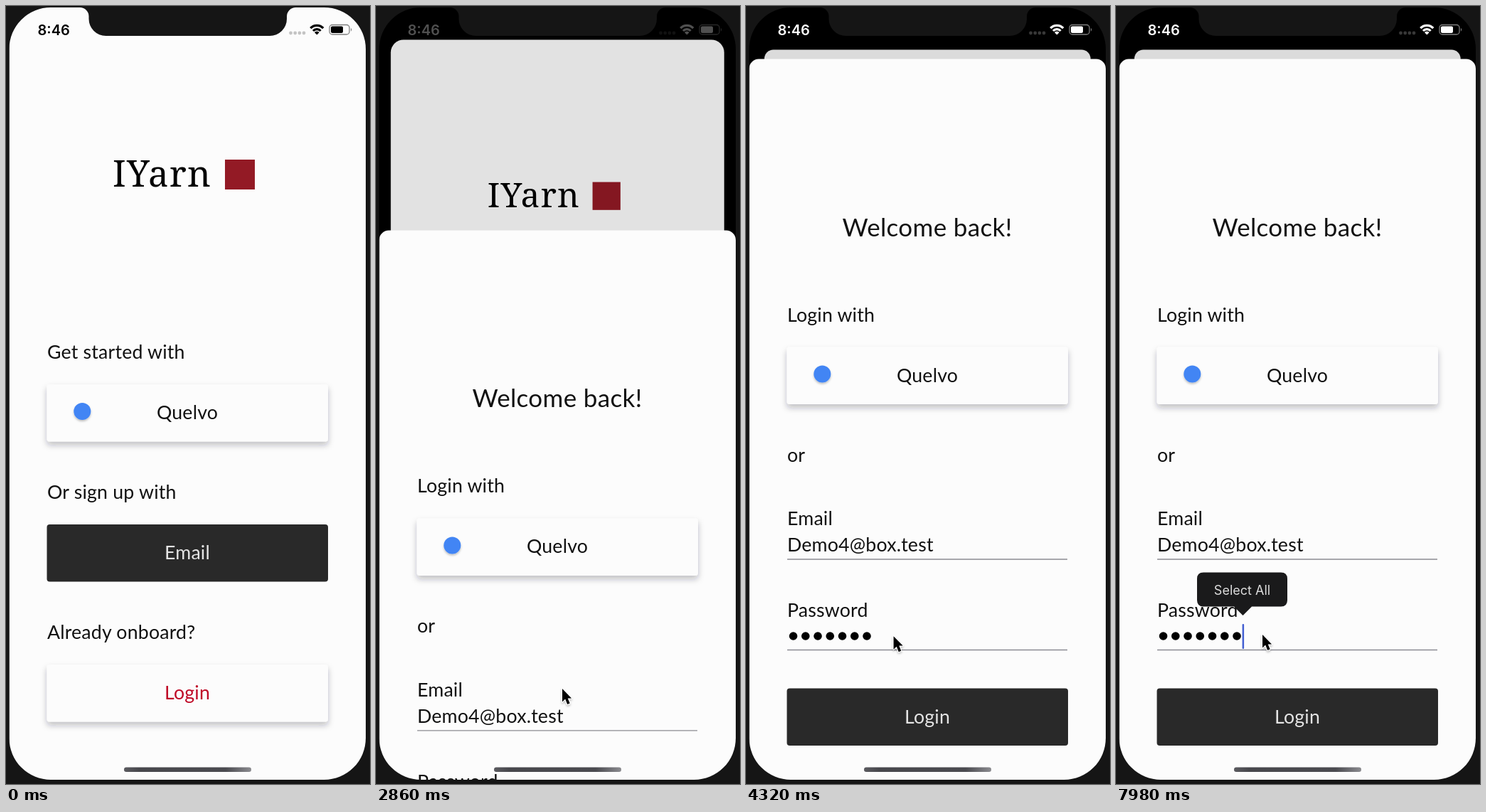
An HTML page for the animation above (8000 ms loop, 512 by 1094 pixels).

```html
<!DOCTYPE html>
<html lang="en">
<head>
<meta charset="utf-8">
<title>Login sheet</title>
<style>
  html, body { margin: 0; width: 100%; height: 100%; overflow: hidden; background: #151515; }
  svg { display: block; width: 100%; height: 100%; }
  text { font-family: Lato, "Open Sans", sans-serif; font-size: 26.700px; letter-spacing: .2px; fill: #111; white-space: pre; }
  .mid { text-anchor: middle; }
  .title { font-size: 35px; letter-spacing: .35px; }
  .mark { font-family: "Noto Serif", serif; font-size: 51px; letter-spacing: 1.200px; fill: #000; }
  .ui { font-family: Inter, sans-serif; letter-spacing: 0; }
  .light { fill: #e4e4e4; }
  .red { fill: #bf0a27; }
</style>
</head>
<body>
<svg viewBox="0 0 512 1094" xmlns="http://www.w3.org/2000/svg">
  <defs>
    <clipPath id="screen">
      <path d="M63 2H104A12.500 12.500 0 0 1 116.500 14.500V18A24 24 0 0 0 140.500 42H371A24 24 0 0 0 395 18V14.500A12.500 12.500 0 0 1 407.500 2H447.500A58.500 58.500 0 0 1 506 60.500V1029.500A58.500 58.500 0 0 1 447.500 1088H63A58.500 58.500 0 0 1 4.500 1029.500V60.500A58.500 58.500 0 0 1 63 2Z"/>
    </clipPath>
    <filter id="shade" x="-10%" y="-20%" width="120%" height="150%">
      <feDropShadow dx="0" dy="5" stdDeviation="4.500" flood-color="#1c1c30" flood-opacity=".27"/>
    </filter>
    <filter id="soft" x="-50%" y="-50%" width="200%" height="200%">
      <feDropShadow dx="0" dy="2" stdDeviation="1.500" flood-opacity=".25"/>
    </filter>
    <linearGradient id="bar">
      <stop offset="0" stop-color="#5b5b60"/>
      <stop offset=".12" stop-color="#47474c"/>
      <stop offset=".8" stop-color="#4b4b50"/>
      <stop offset="1" stop-color="#8c8c90"/>
    </linearGradient>
  </defs>
  <rect width="512" height="1094" fill="#151515"/>
  <g clip-path="url(#screen)">
    <rect width="512" height="1094" fill="#000"/>
    <g id="back">
      <rect class="page" x="4.500" y="2" width="501.500" height="1086" fill="#fcfcfc"/>
      <text class="mark" x="150" y="254">IYarn</text>
      <rect x="308" y="216" width="42" height="42" fill="#931a25"/>
      <g id="start"></g>
      <rect id="dim" class="page" x="4.500" y="2" width="501.500" height="1086"/>
    </g>
    <g id="status">
      <text class="ui" x="44.500" y="40.500" style="font-size:20px;font-weight:600;fill:currentColor">8:46</text>
      <g fill="currentColor" opacity=".22">
        <circle cx="400.500" cy="38" r="2.400"/><circle cx="406.700" cy="38" r="2.400"/>
        <circle cx="412.900" cy="38" r="2.400"/><circle cx="419" cy="38" r="2.400"/>
      </g>
      <path d="M428.300 31.200A12.500 12.500 0 0 1 446.300 31.200M432 35A7.300 7.300 0 0 1 442.600 35" fill="none" stroke="currentColor" stroke-width="3.200"/>
      <path d="M437.300 40.500L434 37.200A4.700 4.700 0 0 1 440.600 37.200Z" fill="currentColor"/>
      <rect x="455" y="26.500" width="28" height="13.500" rx="4" fill="none" stroke="currentColor" stroke-width="1.300" opacity=".5"/>
      <path d="M485 31Q487.500 33.200 485 35.700Z" fill="currentColor" opacity=".5"/>
      <rect x="457" y="28.500" width="17" height="9.500" rx="2" fill="currentColor"/>
    </g>
    <g id="sheet">
      <path d="M4.500 1200V88A13.500 13.500 0 0 1 18 74.500H492.500A13.500 13.500 0 0 1 506 88V1200Z" fill="#fcfcfc"/>
      <g id="form"></g>
      <rect id="caret" x="177.600" y="869" width="2.500" height="35" rx="1" fill="#4460d2"/>
      <g id="menu">
        <path d="M123 796.500H232Q241 796.500 241 805.500V835.500Q241 844.500 232 844.500H191L178.500 857L166 844.500H123Q114 844.500 114 835.500V805.500Q114 796.500 123 796.500Z" fill="#1a1a1b"/>
        <text class="ui mid" x="177.500" y="827.500" style="font-size:18px;fill:#dcdcdc">Select All</text>
      </g>
    </g>
    <rect id="home" x="166" y="1070.500" width="179" height="6.500" rx="3.200"/>
  </g>
  <path id="cursor" d="M0 0V18.500L4.200 14.600L7.200 22L10.700 20.500L7.700 13.400H13.100Z" fill="#000" stroke="#fff" stroke-width="2" stroke-linejoin="round" paint-order="stroke" filter="url(#soft)"/>
</svg>
<script>
const $ = id => document.getElementById(id);
const clamp = (v, lo = 0, hi = 1) => Math.min(hi, Math.max(lo, v));
const mix = (a, b, k) => a + (b - a) * k;
const ramp = (n, a, b) => clamp((n - a) / (b - a));
const ease = k => k * k * (3 - 2 * k);

const label = (str, y, cls = '', x = 58) => `<text class="${cls}" x="${x}" y="${y}">${str}</text>`;
const button = (str, y, cls, dark) =>
  `<rect x="57.500" y="${y}" width="395.500" height="80.500" rx="4" fill="${dark ? '#292929' : '#fcfcfc'}"${dark ? '' : ' filter="url(#shade)"'}/>`
  + label(str, y + 49, 'mid ' + cls, 255);
const social = y => button('Quelvo', y, '') +
  `<circle cx="107.300" cy="${y + 38}" r="12" fill="#4285f4" filter="url(#soft)"/>`;
const rule = y => `<path d="M58 ${y}H452" stroke="#8b8b92" stroke-width="1.300"/>`;
const bullets = (y, count) => Array.from({ length: count }, (_, i) =>
  `<circle cx="${66.500 + i * 17.250}" cy="${y}" r="5.800"/>`).join('');

$('start').innerHTML =
  label('Get started with', 496) + social(532) +
  label('Or sign up with', 693) + button('Email', 729, 'light', true) +
  label('Already onboard?', 890) + button('Login', 926, 'red');

$('form').innerHTML =
  label('Welcome back!', 323.500, 'title mid', 255) +
  label('Login with', 443.500) + social(479.500) +
  label('or', 640.500) +
  label('Email', 730) + label('Demo4@box.test', 767) + rule(778) +
  label('Password', 859) + bullets(886, 7) + rule(905.500) +
  button('Login', 959.500, 'light', true);

const pages = document.querySelectorAll('.page');
const loginText = document.querySelector('.red');

// Uneven playback: 11 ticks per 380 ms, two of them held for 100 ms. Tick 0 opens the sheet.
function tickAt(ms) {
  const t = ms - 2520, lap = Math.floor(t / 380), p = t - lap * 380;
  const step = p < 180 ? Math.max(0, Math.floor(p / 20) - 4)
                       : 5 + Math.max(0, Math.floor((p - 180) / 20) - 4);
  return lap * 11 + step;
}

function caretAlpha(n) {
  if (n < 67) return 0;
  if (n >= 147) return 1;
  const p = (n - 67) % 30;
  return p < 15 ? (n < 82 ? 1 : ramp(p, -1, 2)) : 1 - ramp(p, 14, 17);
}

function draw(ms) {
  const n = tickAt(ms);
  const u = Math.max(0, n + .17) * .302;
  const left = (1 + u) * Math.exp(-u);
  const p = 1 - left;

  // page behind the sheet
  const k = 1 - .085 * p;
  $('back').setAttribute('transform',
    `translate(${255.250 * (1 - k)} ${2 + 59.500 * p - 2 * k}) scale(${k})`);
  pages.forEach(r => r.setAttribute('rx', mix(36, 14, p)));
  $('dim').setAttribute('opacity', .135 * p);
  loginText.setAttribute('opacity', n < -8 ? 1 : n < -1 ? .2 : mix(.2, 1, ramp(n, -1, 9)));

  // sheet
  const drop = 1019.500 * left;
  $('sheet').setAttribute('transform', `translate(0 ${drop})`);
  const tone = Math.round(255 * ramp(n, 4, 20));
  $('status').style.color = `rgb(${tone},${tone},${tone})`;
  const covered = drop > 34 && drop < 114;
  $('home').setAttribute('fill', covered ? '#3b3b3d' : 'url(#bar)');

  $('caret').setAttribute('opacity', caretAlpha(n));
  $('menu').setAttribute('opacity', ramp(n, 147, 153));

  // pointer
  const enter = ease(ramp(n, -22, -12)), move = ease(ramp(n, 32, 52));
  const x = mix(mix(514, 262, enter), 206, move);
  const y = mix(mix(1000, 960, enter), 884, move);
  $('cursor').setAttribute('transform', `translate(${x} ${y})`);
  $('cursor').style.display = enter > 0 ? '' : 'none';
}

function loop() {
  draw(performance.now() % 8000);
  requestAnimationFrame(loop);
}
loop();
</script>
</body>
</html>
```
